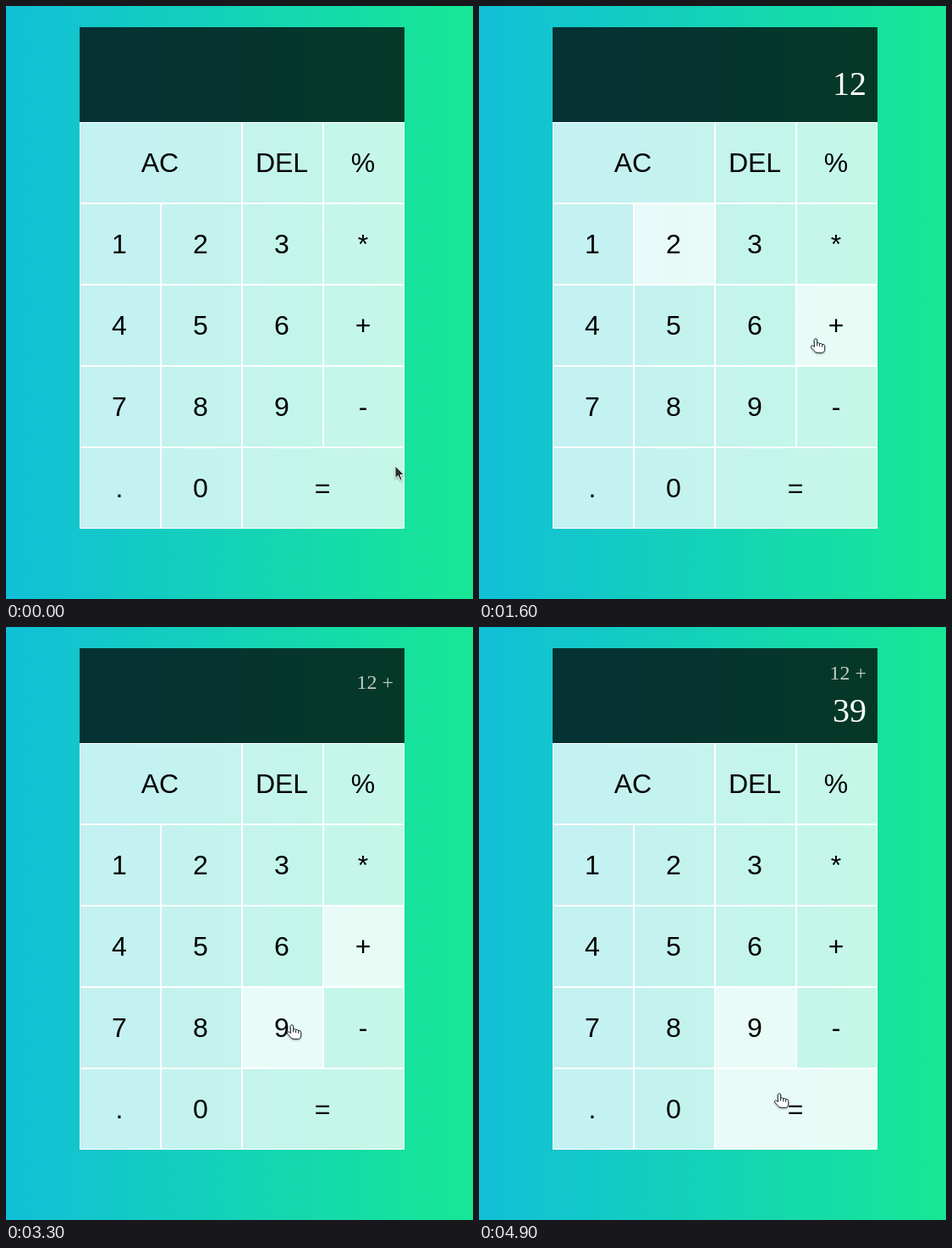
Write an HTML page that moves like this. It is 552 px wide and 700 px high and loops after 5 s.

```html
<!DOCTYPE html>
<html lang="en">
<head>
<meta charset="utf-8">
<title>Calculator</title>
<style>
  html, body { margin: 0; width: 100%; height: 100%; overflow: hidden; }
  body { position: relative; background: linear-gradient(to right, #11bfd8, #17e795); }
  .calc {
    position: absolute; left: 87px; top: 25px;
    display: grid; grid-template: 112px repeat(5, 96px) / repeat(4, 96px);
  }
  .screen {
    grid-column: 1 / -1; box-sizing: border-box; padding: 12px 13px 12px 12px;
    display: flex; flex-direction: column; align-items: flex-end; justify-content: space-around;
    background: rgba(0, 0, 0, .75); color: #fff;
    font-family: "Liberation Serif", "Times New Roman", serif;
  }
  .prev { font-size: 24px; color: rgba(255, 255, 255, .75); }
  .curr { font-size: 40px; }
  .key {
    box-sizing: border-box; border: 1px solid #fff; padding-right: 2px;
    display: flex; align-items: center; justify-content: center;
    background: rgba(255, 255, 255, .75); color: #000;
    font: 32px "Liberation Sans", Arial, sans-serif;
  }
  .wide { grid-column: span 2; }
  .lit { background: rgba(255, 255, 255, .9); }
  .cursor {
    position: absolute; left: 0; top: 0; width: 1px; height: 1px; overflow: visible;
    stroke-linejoin: round; stroke-linecap: round;
    filter: drop-shadow(0 1px 1px rgba(0, 0, 0, .35));
  }
</style>
</head>
<body>
<div class="calc">
  <div class="screen"><div class="prev"></div><div class="curr"></div></div>
</div>
<svg class="cursor">
  <path id="arrow" d="M0 0V14.5L3.4 11.4L6 17L8.3 16L6 10.5H10.4Z" fill="#25302f" stroke="#fff"/>
  <g id="hand" fill="none" stroke="#1c2a38">
    <path fill="#fff" d="M-1.7 1Q0-2 1.6 1V5Q3.6 4 4.6 5.6Q6.6 4.8 7.6 6.4Q10.5 6 10.7 8.5V12Q10.5 16.3 7 16.3H2Q-.5 16.3-2 13.7L-5.4 10Q-6 6-1.7 9.2Z"/>
    <path d="M1.6 5v3M4.6 5.6v3M7.6 6.4v3"/>
  </g>
</svg>
<script>
  const LOOP = 5000, STEP = 100;
  const $ = s => document.querySelector(s);
  const calc = $('.calc'), prev = $('.prev'), curr = $('.curr');
  const cursor = $('.cursor'), arrow = $('#arrow'), hand = $('#hand');

  const keys = [...'AC DEL % 1 2 3 * 4 5 6 + 7 8 9 - . 0 ='.split(' ')].map(label => {
    const el = document.createElement('div');
    el.className = 'key';
    el.classList.toggle('wide', label === 'AC' || label === '=');
    el.textContent = label;
    calc.append(el);
    return { el, label };
  });

  // Pointer moves: start time, end time, destination
  const home = [460, 543];
  const moves = [
    [100, 500, 140, 288],
    [800, 1200, 228, 285],
    [1200, 1600, 398, 393],
    [1600, 2000, 411, 396],
    [2200, 2700, 390, 421],
    [2700, 2900, 365, 526],
    [2900, 3200, 338, 470],
    [3300, 3600, 317, 308],
    [3900, 4300, 335, 470],
    [4500, 4900, 355, 551]
  ];

  const presses = [[700, '1'], [1200, '2'], [2000, '+'], [3800, '3'], [4400, '9']];

  const clamp = v => Math.min(1, Math.max(0, v));
  const ease = k => k * k * (3 - 2 * k);

  function pointAt(t) {
    let [x, y] = home;
    for (const [from, to, toX, toY] of moves) {
      const k = ease(clamp((t - from) / (to - from)));
      x += (toX - x) * k;
      y += (toY - y) * k;
    }
    return [Math.round(x), Math.round(y)];
  }

  // Replays the presses made so far, as the calculator would handle them
  function stateAt(t) {
    const state = { upper: '', lower: '', focused: '' };
    for (const [time, label] of presses) {
      if (time > t) break;
      state.focused = label;
      if (label === '+') {
        state.upper = state.lower + ' +';
        state.lower = '';
      } else {
        state.lower += label;
      }
    }
    return state;
  }

  function isOver(el, x, y) {
    const r = el.getBoundingClientRect();
    return x >= r.left && x < r.right && y >= r.top && y < r.bottom;
  }

  function draw(t) {
    const [x, y] = pointAt(t), idle = t === 0;
    const { upper, lower, focused } = stateAt(t);
    prev.textContent = upper;
    curr.textContent = lower;
    for (const { el, label } of keys)
      el.classList.toggle('lit', label === focused || !idle && isOver(el, x, y));
    cursor.style.transform = `translate(${x}px, ${y}px)`;
    arrow.style.display = idle ? '' : 'none';
    hand.style.display = idle ? 'none' : '';
  }

  let start, last;
  function tick(now) {
    start ??= now;
    const t = Math.floor((now - start) % LOOP / STEP) * STEP;
    if (t !== last) draw(last = t);
    requestAnimationFrame(tick);
  }
  draw(0);
  requestAnimationFrame(tick);
</script>
</body>
</html>
```
